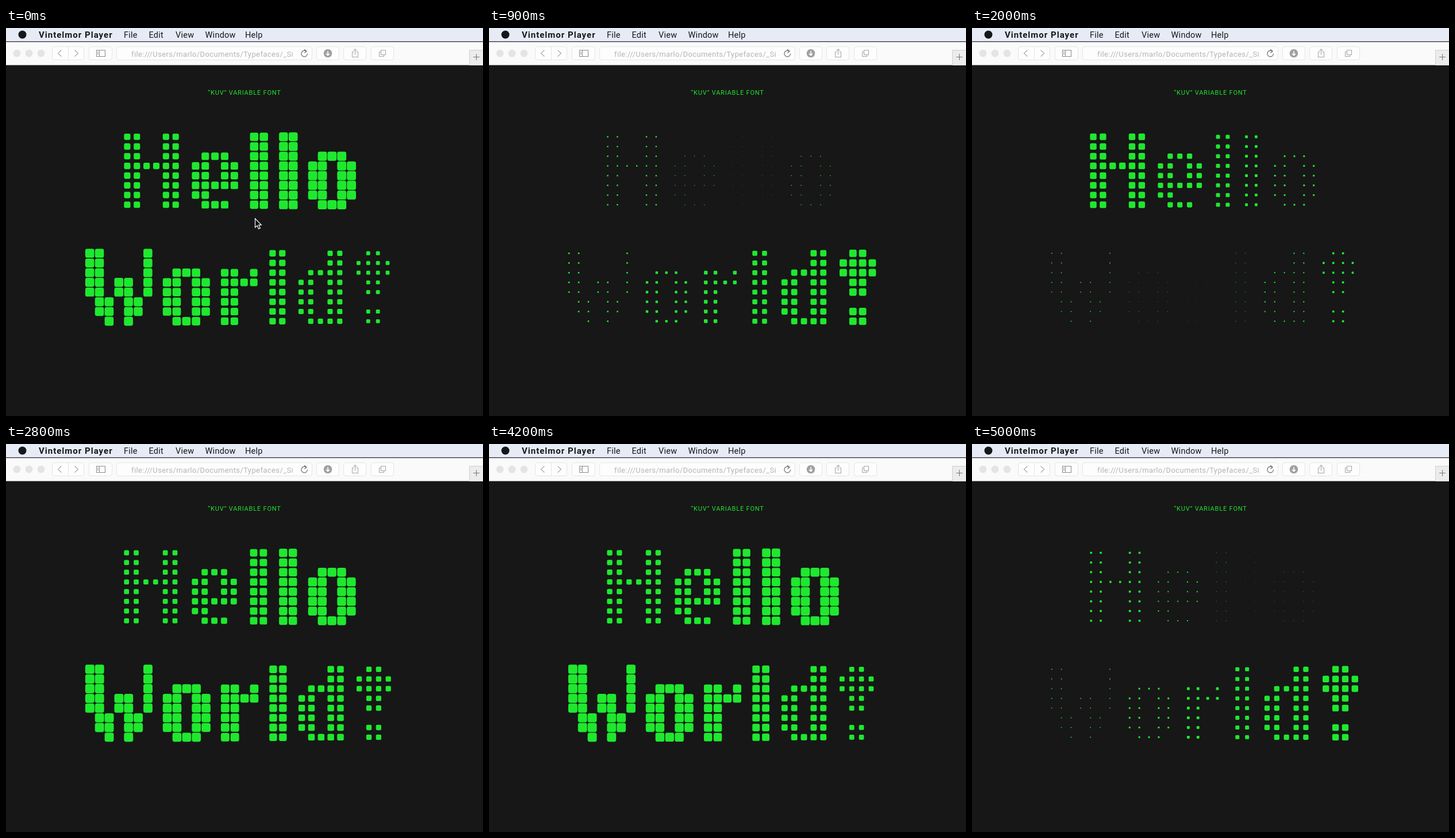
Write an HTML page with a canvas that moves like this. It is 830x674 px and loops after 5.5 s.

```html
<!DOCTYPE html>
<html lang="en">
<head>
<meta charset="utf-8">
<title>Variable font</title>
<style>
  html, body { margin: 0; width: 100%; height: 100%; overflow: hidden; background: #171717; }
  svg, canvas { position: absolute; left: 0; top: 0; width: 830px; height: 674px; }
  text { font-family: Roboto, sans-serif; white-space: pre; }
  .menu { font-size: 14.5px; letter-spacing: .25px; fill: #15171b; }
  .app { font-size: 15px; font-weight: 700; letter-spacing: 1px; }
  .path { font-size: 13px; letter-spacing: .4px; fill: #b4b4b4; }
  .title { font-size: 11px; letter-spacing: .8px; fill: #1fe52f; }
  .button { fill: #fdfdfd; stroke: #e5e5e5; }
  .icon { fill: none; stroke: #a9a9a9; stroke-width: 1.1; }
</style>
</head>
<body>
<svg viewBox="0 0 830 674">
  <rect width="830" height="23" fill="#e6ebf5"/>
  <rect y="23" width="830" height="1.3" fill="#34383f"/>
  <rect y="24.3" width="830" height="40.2" fill="#fafafa"/>

  <circle cx="28.5" cy="11.5" r="7" fill="#15171b"/>
  <g class="menu">
    <text class="app" x="57" y="17">Vintelmor Player</text>
    <text x="205" y="17">File</text>
    <text x="248.5" y="17">Edit</text>
    <text x="295" y="17">View</text>
    <text x="346.5" y="17">Window</text>
    <text x="416" y="17">Help</text>
  </g>

  <g fill="#e4e4e4">
    <circle cx="19" cy="44" r="6.5"/>
    <circle cx="40" cy="44" r="6.5"/>
    <circle cx="61" cy="44" r="6.5"/>
  </g>
  <g class="button">
    <rect x="80.5" y="32.5" width="55" height="23" rx="4"/>
    <path d="M108.5 33v22"/>
    <rect x="144.5" y="32.5" width="40" height="23" rx="4"/>
    <rect x="192.5" y="32.5" width="340" height="23" rx="4"/>
    <rect x="540.5" y="32.5" width="39" height="23" rx="4"/>
    <rect x="587.5" y="32.5" width="39" height="23" rx="4"/>
    <rect x="635.5" y="32.5" width="39" height="23" rx="4"/>
  </g>
  <text class="path" x="218" y="49.5">file:///Users/marlo/Documents/Typefaces/_Si</text>

  <g class="icon">
    <path d="M96.5 38.5l-6 5.5 6 5.5M119.5 38.5l6 5.5-6 5.5"/>
    <path stroke="#8f8f8f" d="M157.5 38.5h15v11h-15zM162.5 38.5v11M159 41.5h2M159 43.5h2M159 45.5h2"/>
    <path stroke="#777" stroke-width="1.3" d="M523.3 41.2a5.3 5.3 0 1 0 1.2 3.3M519 37l4 3.2-3.6 3.2"/>
    <path d="M605 41.5h-2.5v9h10v-9h-2.500M607.500 46.500v-9.500M604.500 39.700l3-3 3 3"/>
    <path d="M652.500 38.500h8v8h-8zM652.500 41.500h-3v8h8v-3"/>
  </g>
  <circle cx="560" cy="44" r="7.3" fill="#a0a0a0"/>
  <path d="M560 40v7M557 44.500l3 3 3-3" fill="none" stroke="#fff" stroke-width="1.6"/>

  <rect x="806.5" y="38.500" width="24" height="26" fill="#ececec" stroke="#cfcfcf"/>
  <path d="M818.500 45v11M813 50.500h11" stroke="#777" stroke-width="1.1"/>

  <text class="title" x="415" y="116" text-anchor="middle">“KUV” VARIABLE FONT</text>
</svg>
<canvas id="stage" width="830" height="674"></canvas>
<svg id="cursor" viewBox="0 0 830 674">
  <path d="M433.500 331v15.500l3.600-3.300 2.500 5.700 2.700-1.200-2.500-5.500h4.500z" fill="#111" stroke="#fff" stroke-width="1.2"/>
</svg>

<script>
const ctx = document.getElementById('stage').getContext('2d');
const cursor = document.getElementById('cursor');

const LOOP = 5500, STEP = 100, LAST = 5000;
const PERIOD = 1383, LEAD = 64.5, PEAK = 365;
const PITCH = 16.86, LEFT = 137.9, TOP = 189;
const MIN = 0.6, MAX = 15.9;

// Each glyph lists the filled columns of its eight rows.
const stem = '01 01 01 01 01 01 01 01';
const round = '- - 123 0134 0134 0134 0134 123';
const glyphs = {
  H: '0145 0145 0145 012345 0145 0145 0145 0145',
  e: '- - 123 0134 0134 01234 01 123',
  l: stem,
  o: round,
  W: '016 016 016 01346 01346 1245 1245 24',
  r: '- - 013 0123 01 01 01 01',
  d: '34 34 1234 0134 0134 0134 0134 1234',
  '!': '12 0123 0123 12 12 - 12 12'
};

// Character, grid column, grid row
const letters = [
  ['H', 4, 0], ['e', 11, 0], ['l', 17, 0], ['l', 20, 0], ['o', 23, 0],
  ['W', 0, 12], ['o', 8, 12], ['r', 14, 12], ['l', 19, 12], ['d', 22, 12], ['!', 28, 12]
].map(([char, col, row]) => glyphs[char].split(' ').flatMap((cols, r) =>
  cols === '-' ? [] : [...cols].map(c => [LEFT + PITCH * (col + +c), TOP + PITCH * (row + r)])));

function dotSize(index, time) {
  const wave = Math.cos(2 * Math.PI * (time + index * LEAD - PEAK) / PERIOD);
  return MIN + (MAX - MIN) * (1 + wave) / 2;
}

function draw(time) {
  // The wave starts slightly ahead and settles within 300 ms.
  const phase = time + 105 * Math.max(0, 1 - time / 300);
  ctx.clearRect(0, 0, 830, 674);
  ctx.fillStyle = '#1fe82f';
  ctx.beginPath();
  letters.forEach((dots, i) => {
    const size = dotSize(i, phase);
    for (const [x, y] of dots) ctx.roundRect(x, y - size / 2, size, size, size * 0.22);
  });
  ctx.fill();
  cursor.style.visibility = time < STEP ? 'visible' : 'hidden';
}

const start = performance.now();
function tick() {
  const t = (performance.now() - start) % LOOP;
  draw(Math.min(LAST, Math.floor(t / STEP) * STEP));
  requestAnimationFrame(tick);
}
tick();
</script>
</body>
</html>
```
